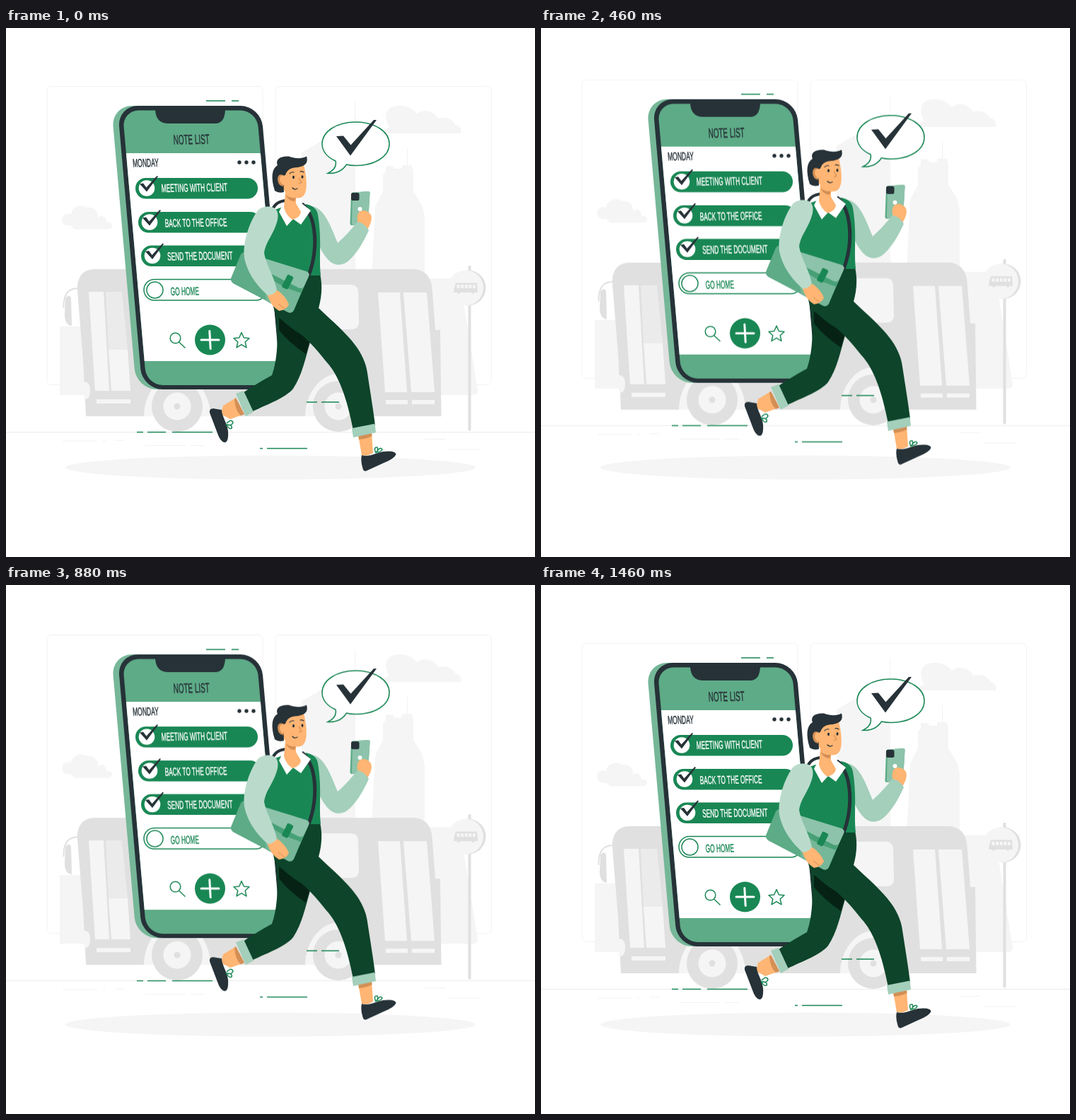
An HTML page for the animation above (1.5 s loop, 748 by 748 pixels).

```html
<!DOCTYPE html>
<html lang="en">
<head>
<meta charset="utf-8">
<title>Note list</title>
<style>
html, body { margin: 0; height: 100%; overflow: hidden; background: #fff; }
svg { display: block; width: 100vw; height: 100vh; }

/* 24 steps a second, up and down, resting for one step at either end */
#scene { animation: bob 1.5s steps(17) -4ms infinite; }
@keyframes bob {
  0%, 97.222%, 100% { transform: translateY(0); }
  47.222%, 50% { transform: translateY(-14.4px); }
}

.pale { fill: #f5f5f5; }
.gray { fill: #e0e0e0; }
.white { fill: #fff; }
.dark { fill: #263238; }
.green { fill: #198754; }
.mid { fill: #5eab87; }
.soft { fill: #75b798; }
.mint { fill: #a3cfbb; }
.skin { fill: #ffb573; }
.tan { fill: #d38f55; }
.pants { fill: #0d442a; }
.line { fill: none; stroke: #198754; stroke-width: 1.5; }
.ink { fill: none; stroke: #263238; stroke-linecap: round; }
.faint { fill: none; stroke: #f2f2f2; }
text { font: 16px "Liberation Sans", Arial, sans-serif; stroke-width: .45; }
.onWhite { fill: #263238; stroke: #263238; }
.onGreen { fill: #fff; stroke: #fff; }
.open { fill: #198754; stroke: #198754; }
</style>
</head>
<body>
<svg viewBox="0 0 748 748">
<defs>
  <path id="tick" class="dark" d="M189 220.500L194 219.500L198.500 225.500L213.500 209L215 210L199 231.500Z"/>
  <g id="done">
    <rect class="green" x="183" y="212" width="173" height="29.500" rx="14.700"/>
    <circle class="white" cx="199" cy="226.500" r="11.300"/>
    <use href="#tick"/>
  </g>
  <g id="wheel">
    <path class="pale" d="M-47 14C-47-17-26-46 0-46S47-17 47 14Z"/>
    <circle class="gray" r="36"/>
    <circle class="pale" r="19.500"/>
    <circle class="gray" r="4.500"/>
  </g>
</defs>

<ellipse class="pale" cx="374" cy="621.500" rx="290" ry="17"/>

<g id="scene">
  <!-- city -->
  <g class="faint">
    <rect x="58" y="82.500" width="305" height="422" rx="6"/>
    <rect x="381" y="82.500" width="305.500" height="422" rx="6"/>
    <path stroke="#ebebeb" d="M0 571.500H748"/>
    <path d="M80 584H128M136 584H141M154 583H168M197 590.500H253M592 581.500H621M625 596H672M260 590.500H280"/>
    <path d="M493.500 104V135M567.500 170V196"/>
  </g>
  <g class="pale">
    <path d="M418 176L466 148L494 130V352H418Z"/>
    <path d="M517 354L522 252L533 231V207L537 203V195H547L549 199H559L561 194H574L576 204V231L589 252L592 268V354Z"/>
    <path d="M533 149C533 144 537 141 542 141C533 125 537 110 555 110C569 109 577 116 581 121C591 113 606 118 611 128C622 124 633 130 635 137C641 137 645 142 643 149Z"/>
    <path d="M80 275C77 266 84 260 92 263C94 252 106 248 115 254C125 252 131 260 130 269C134 263 142 266 142 275C148 274 151 278 150 281Q148 284.500 143 284.500H104C100 286 94 284 92 279Q84 281 80 275Z"/>
    <path d="M76 422H131V455H185V519H76Z"/>
    <path d="M592 354H633L648 394L667 513Q667 519 661 519H592Z"/>
  </g>

  <!-- bus -->
  <path fill="none" stroke="#e0e0e0" stroke-width="2" d="M104 368C87 367 81 378 81.500 396"/>
  <path class="gray" d="M84 382Q90 375 92 382L93 421Q83 420 83 405Z"/>
  <path class="gray" d="M101 372V364Q103 342 125 341H578Q598 343 602 364L603 374L607 427H614L615.500 549H113L109 470Z"/>
  <g class="pale">
    <path d="M117 373H138L146 513H126Z"/>
    <path fill="#ebebeb" d="M141 373H164L172 455H145Z"/>
    <path d="M145 455H172L176 513H149Z"/>
    <path d="M128 525H176V531H128Z"/>
    <path d="M109 500Q119 500 119 512T113 525H111Z"/>
    <path d="M400 363H489Q498 364 498 373L499 416Q499 426 488 426H400Z"/>
    <path d="M526 374H557L567 515H536Z"/>
    <path d="M562 374H595L606 515H573Z"/>
    <path d="M537 526H568V532H537ZM574 526H606V532H574Z"/>
  </g>
  <use href="#wheel" x="242" y="535"/>
  <use href="#wheel" x="470" y="535"/>

  <!-- bus stop -->
  <rect class="gray" x="653.500" y="336" width="4" height="233.500" rx="1.500"/>
  <circle class="gray" cx="653.500" cy="367.500" r="25"/>
  <circle class="pale" cx="650" cy="367.500" r="25"/>
  <path class="gray" d="M636 360.500H666L667 374H633L634 367Z"/>
  <path stroke="#f5f5f5" stroke-width="5" stroke-dasharray="4 1.600" d="M637.500 365.500H665"/>
  <path stroke="#e0e0e0" stroke-width="4" stroke-linecap="round" d="M640 374V374M660 374V374"/>

  <!-- big phone -->
  <g transform="matrix(1 0 .088 1 -9.700 0)">
    <rect class="soft" x="149" y="110" width="150" height="401" rx="29"/>
    <rect class="dark" x="157.500" y="110" width="203" height="401" rx="29"/>
    <rect class="mid" x="164" y="116.500" width="190" height="388.500" rx="23"/>
    <path class="white" d="M164 177H354V471H164Z"/>
  </g>
  <path class="dark" d="M211 116H310Q309 135 296 135H228Q212 134 211 116Z"/>
  <g class="dark">
    <circle cx="330" cy="190" r="2.700"/><circle cx="340" cy="190" r="2.700"/><circle cx="350" cy="190" r="2.700"/>
  </g>
  <use href="#done"/>
  <use href="#done" x="4" y="48"/>
  <use href="#done" x="8" y="95.500"/>
  <rect class="line" x="195" y="355.500" width="173" height="29.500" rx="14.700"/>
  <circle class="line" cx="210.500" cy="370.500" r="11.500"/>
  <g id="labels"></g>
  <g class="line">
    <circle cx="239.500" cy="438.500" r="7.300"/>
    <path d="M244.500 444L253.500 452.500"/>
    <path stroke-linejoin="round" d="M333 430.500L336.300 438L344 438.800L338.200 444L340 451.800L333 447.700L326 451.800L327.800 444L322 438.800L329.700 438Z"/>
  </g>
  <circle class="green" cx="288.500" cy="441" r="21.500"/>
  <path stroke="#fff" stroke-width="3" stroke-linecap="round" d="M276 441H301M287.800 428.500L289.200 453.500"/>

  <path class="line" d="M283 103H310M319 103H329M425 529H440M446 529H471M185 571.500H194M200 571.500H226M235 571.500H292M359 594.500H363M369 594.500H426"/>

  <!-- speech bubble -->
  <path class="line" style="fill:#fff" d="M494.500 133C521 133 542 146 542 164S521 194.500 494.500 194.500C489 194.500 485 194 481.500 193C475 203 465 206 455 205.500C464 201 468 196 466 188C454 183 447 174 447 164C447 146 468 133 494.500 133Z"/>
  <path class="dark" d="M467 153L477 152.500L487.500 165.500L520 130H524L487 180.500Z"/>

  <!-- raised arm -->
  <path class="mid" d="M490 232.500L512 231Q515 231 514.500 234L512 274Q511.500 277 509 277L489 279Q486.500 279 486.500 276L488 236Q488 233 490 232.500Z"/>
  <path fill="#8cc3aa" d="M492 232.500L512 231Q515 231 514.500 234L512 274Q511.500 277 509 277L491 278.500Q489 278.500 489 276L490 235Q490 233 492 232.500Z"/>
  <rect class="dark" x="488" y="233" width="11.500" height="11" rx="2.500"/>
  <circle class="white" cx="500.500" cy="256" r="3"/>
  <path class="skin" d="M498 262C501 257 511 256 516 264C519 273 513 281 510 287L499 279C496 273 496 266 498 262Z"/>
  <path class="mint" d="M432 252C450 254 459 280 469 304C478 296 488 285 497 274Q507 276 513 286C505 304 494 322 482 331Q469 339 458 330Q449 322 442 306Z"/>

  <!-- back leg -->
  <path class="skin" d="M325 523L337 546L317 553L304 546L307 534Z"/>
  <path class="tan" d="M325 523L337 546L332 548Q324 541 323 525Z"/>
  <path class="dark" d="M288 544Q287 538 293 538L305 540C305 549 313 559 314 570Q315 586 309 586Q303 585 299 573Z"/>
  <path class="line" d="M312 559Q319 552 321 558Q319 563 312 561Q321 561 319 566Q315 568 311 560" stroke-width="1"/>
  <path class="pants" d="M379 392C387 430 384 470 376 491C360 500 346 508 335 516L347 543C372 531 395 523 406 510C419 490 423 468 430 444L425 400Z"/>
  <path fill="#062215" d="M386 410L430 442L424 461Q399 444 386 427Z"/>
  <path class="mint" d="M325 517L336 513L350 543L339 549Z"/>

  <!-- front leg -->
  <path class="skin" d="M498 575L517 572L519 601Q511 606 503 604Z"/>
  <path class="tan" d="M498 575L517 572L517.500 577Q510 581 499 582Z"/>
  <path class="dark" d="M503 604C513 607 523 601 533 599Q551 597 551.500 603Q549 609 534 615L510 626Q506 628 504.500 623Q501 612 503 604Z"/>
  <path class="line" d="M523 601Q519 592 525 593Q527 597 523 601Q529 591 532 596Q530 600 522 600" stroke-width="1"/>
  <path class="pants" d="M376 385L384 348H444C448 365 446 382 442 396C478 430 506 452 511 488C516 520 520 545 522 562L491 569C482 522 470 490 453 472C441 457 431 445 418 434Q395 420 380 402Z"/>
  <path class="mint" d="M489 566L521.500 559.500L523 572L491 579Z"/>

  <!-- torso -->
  <path class="ink" stroke-width="4" d="M375 262C378 249 387 244 398 244"/>
  <path class="green" d="M366 262L391 253L407 271L424 249Q439 252 441 264C447 300 442 325 445 350H384L364 325Z"/>
  <path class="ink" stroke-width="5" d="M420 250C439 268 442 312 428 350"/>
  <path class="white" d="M392 248L386 260L397 280L406 270L417 278L431 258L418 248Z"/>
  <path class="skin" d="M395 232L393 254Q396 265 405 271Q416 268 417 260L410 248V236Z"/>
  <path class="tan" d="M395 236Q402 241 410 240L408 245Q400 245 395 236Z"/>

  <!-- head -->
  <path class="skin" d="M390 207Q397 197 421 193C424 205 426 220 424 230Q421 243 408 240Q395 237 390 222Z"/>
  <path class="dark" d="M380 230C374 211 376 199 384 194C380 184 391 181 400 181.500C410 185 418 185 425 181.500Q429 194 413 197Q398 197 395 208L392 209L393 232Q385 234 380 230Z"/>
  <path class="tan" d="M392 208Q385 205 384 213Q384 223 392 224Z"/>
  <path class="skin" d="M394 209Q387 207 387 215Q389 223 395 222Z"/>
  <g class="dark">
    <ellipse cx="406.500" cy="211" rx="1.500" ry="2.300"/>
    <ellipse cx="419" cy="210.500" rx="1.500" ry="2.300"/>
  </g>
  <path class="ink" d="M401 206Q403 203 407 204M416 203Q418 202 421 204M405 226Q408 229.500 412 227" stroke-width="1.200"/>
  <path fill="none" stroke="#d38f55" stroke-width="1.200" d="M414 212L418 218.500L414 220"/>

  <!-- bag -->
  <path class="mid" d="M337 317L424 344Q430 346 428 351L407 399Q404 404 399 402L321 361Q317 358 318 354L332 320Q334 317 337 317Z"/>
  <path class="soft" d="M362 337L418 372L407 399Q404 404 399 402L368 386Z"/>
  <path fill="#47a076" d="M352 329L420 365L417 375Q385 365 358 343Z"/>
  <path fill="#8cc3aa" d="M337 317L424 344Q430 346 428 351L422 364Q419 370 413 367L366 343Q348 333 337 317Z"/>
  <rect class="green" x="393.500" y="349" width="9.500" height="20" rx="2.500" transform="rotate(27 398 359)"/>

  <!-- near arm -->
  <path class="skin" d="M369 376L384 371C391 376 398 384 400 391Q396 399 386 400Q374 393 369 376Z"/>
  <path fill="none" stroke="#d38f55" d="M385 390L394 397"/>
  <path fill="#badbcc" d="M371 252.500Q387 253 384 271C379 292 368 300 365 318C368 336 379 350 383 371Q378 378 370 378C353 363 341 345 337 325C334 302 346 270 357 257Q363 252 371 252.500Z"/>
</g>
</svg>
<script>
const labels = [
  ["NOTE LIST", 237, 164.5, 19, "onWhite"],
  ["MONDAY", 179.5, 196.5, 16.3, "onWhite"],
  ["MEETING WITH CLIENT", 220, 232, 16, "onGreen"],
  ["BACK TO THE OFFICE", 225, 281.5, 16, "onGreen"],
  ["SEND THE DOCUMENT", 228.5, 328.5, 16, "onGreen"],
  ["GO HOME", 233, 378, 16, "open"],
];
// one condensed, back-leaning face for every label
for (const [words, x, y, size, tone] of labels) {
  const el = document.createElementNS("http://www.w3.org/2000/svg", "text");
  el.textContent = words;
  el.setAttribute("class", tone);
  el.style.fontSize = size + "px";
  el.setAttribute("transform", `matrix(.52 -.008 .06 1 ${x} ${y})`);
  document.getElementById("labels").append(el);
}
</script>
</body>
</html>
```
